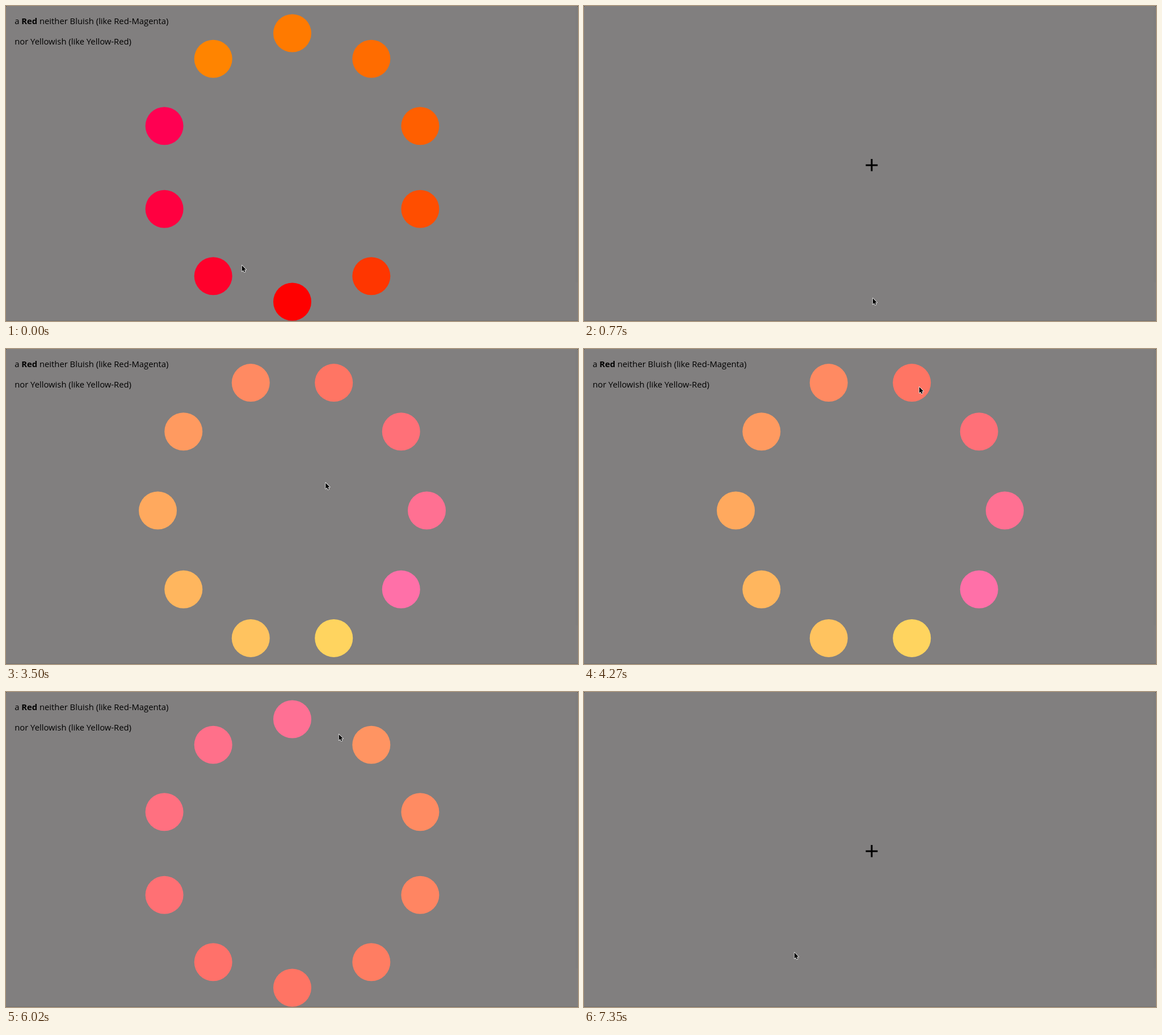
Recreate the animation shown at these times as an HTML page with a canvas. Size 1008x556 px, loop 8000 ms.

```html
<!DOCTYPE html>
<html lang="en">
<head>
<meta charset="utf-8">
<title>Pick the red</title>
<style>
html, body { margin: 0; width: 100%; height: 100%; overflow: hidden; background: #817f7f; }
canvas { display: block; }
</style>
</head>
<body>
<canvas id="stage" width="1008" height="556"></canvas>
<script>
const ctx = document.getElementById('stage').getContext('2d');
const LOOP = 8000, STEP = 70;
const CENTER = { x: 504.5, y: 285 }, RING_RADIUS = 237, DOT_RADIUS = 33.5;

// Colours run clockwise; `turn` is the first dot's angle from the top.
// From `release` on, the pointer is an arrow even over a dot.
const rings = [
  { from: 0, release: 770, to: 770, turn: 0,
    colors: '#ff7a00 #ff6c00 #ff5f00 #ff4e00 #ff3600 #ff0000 #ff002b #ff0040 #ff0052 #ff8400' },
  { from: 2380, release: 4200, to: 4340, turn: 18,
    colors: '#ff7564 #ff7078 #ff7092 #ff70a8 #ffd45f #ffc35f #ffb65e #ffa95e #ff9a60 #ff8a62' },
  { from: 5390, release: 7280, to: 7350, turn: 0,
    colors: '#ff7094 #ff9462 #ff8b62 #ff8562 #ff7d62 #ff7464 #ff716a #ff7074 #ff7080 #ff708a' }
];
for (const ring of rings) {
  ring.dots = ring.colors.split(' ').map((color, i) => {
    const angle = (ring.turn + 36 * i) * Math.PI / 180;
    return {
      color,
      x: CENTER.x + RING_RADIUS * Math.sin(angle),
      y: CENTER.y - RING_RADIUS * Math.cos(angle)
    };
  });
}

// Pointer stops: time, x, y
const stops = [
  [0, 415.7, 457.8], [700, 508.9, 515.8],
  [3010, 508.9, 515.8], [3850, 596, 67.5], [3990, 590.9, 67],
  [5950, 590.9, 67], [6790, 373.5, 456.5], [7140, 370.7, 459.8],
  [LOOP, 370.7, 459.8]
];

const arrow = new Path2D('M0 0V10.6L2.4 8.4L4 12L5.8 11.2L4.2 7.7H7.5Z');
const hand = new Path2D(
  'M-1.1 .6Q-.3 -.7 .8 .4L2 3.6Q3 2.9 3.7 3.8Q4.7 3.2 5.3 4.2Q6.7 3.9 7 5.4' +
  'L7.2 8Q7 9.3 6.3 10.2V11.6H1.7L1.2 10.4L-2.3 7.7Q-2.6 6.4 -1.2 6.5L.6 7.2Z');
const handCreases = new Path2D('M2.6 7.2V9.4M4.1 7.2V9.4M5.6 7.2V9.4');

function pointerAt(t) {
  const i = stops.findIndex(stop => t < stop[0]);
  const [t0, x0, y0] = stops[i - 1], [t1, x1, y1] = stops[i];
  const p = (t - t0) / (t1 - t0), eased = p * p * (3 - 2 * p);
  return { x: x0 + (x1 - x0) * eased, y: y0 + (y1 - y0) * eased };
}

function drawBackground() {
  ctx.fillStyle = '#817f7f';
  ctx.fillRect(0, 0, 1008, 556);
  ctx.fillStyle = 'rgba(0,0,0,.12)';
  ctx.fillRect(0, 555, 1008, 1);
  ctx.fillStyle = 'rgba(0,0,0,.02)';
  ctx.fillRect(1004, 0, 4, 488);
  ctx.fillStyle = 'rgba(0,0,0,.5)';
  for (const x of [0, 1007]) ctx.fillRect(x, 0, 1, 1);
}

function drawText(x, y, ...runs) {
  ctx.fillStyle = '#000';
  for (const [text, weight] of runs) {
    ctx.font = `${weight} 14.8px "Open Sans", "Noto Sans", sans-serif`;
    ctx.fillText(text, x, y);
    x += ctx.measureText(text).width;
  }
}

function drawRing(ring) {
  drawText(15.2, 31.7, ['a ', 400], ['Red', 700], [' neither Bluish (like Red-Magenta)', 400]);
  drawText(15.2, 67.7, ['nor Yellowish (like Yellow-Red)', 400]);
  for (const dot of ring.dots) {
    ctx.fillStyle = dot.color;
    ctx.beginPath();
    ctx.arc(dot.x, dot.y, DOT_RADIUS, 0, 2 * Math.PI);
    ctx.fill();
  }
}

function drawCross() {
  ctx.fillStyle = '#000';
  ctx.fillRect(496.5, 279.5, 21, 3);
  ctx.fillRect(505.5, 270, 3, 21.5);
}

function drawPointer({ x, y }, isHand) {
  ctx.save();
  ctx.translate(x, y);
  ctx.lineJoin = 'round';
  if (isHand) {
    ctx.fillStyle = '#fff';
    ctx.strokeStyle = '#000';
    ctx.lineWidth = 0.9;
    ctx.fill(hand);
    ctx.stroke(hand);
    ctx.lineWidth = 0.6;
    ctx.stroke(handCreases);
  } else {
    ctx.strokeStyle = '#fff';
    ctx.lineWidth = 1.5;
    ctx.stroke(arrow);
    ctx.fillStyle = '#000';
    ctx.fill(arrow);
  }
  ctx.restore();
}

function draw(t) {
  const ring = rings.find(r => t >= r.from && t < r.to);
  const pointer = pointerAt(t);
  drawBackground();
  if (ring) drawRing(ring);
  else drawCross();
  const overDot = ring && t < ring.release &&
    ring.dots.some(dot => Math.hypot(dot.x - pointer.x, dot.y - pointer.y) < DOT_RADIUS);
  drawPointer(pointer, overDot);
}

function tick() {
  const t = performance.now() % LOOP;
  draw(Math.floor(t / STEP) * STEP);
  requestAnimationFrame(tick);
}
tick();
</script>
</body>
</html>
```
